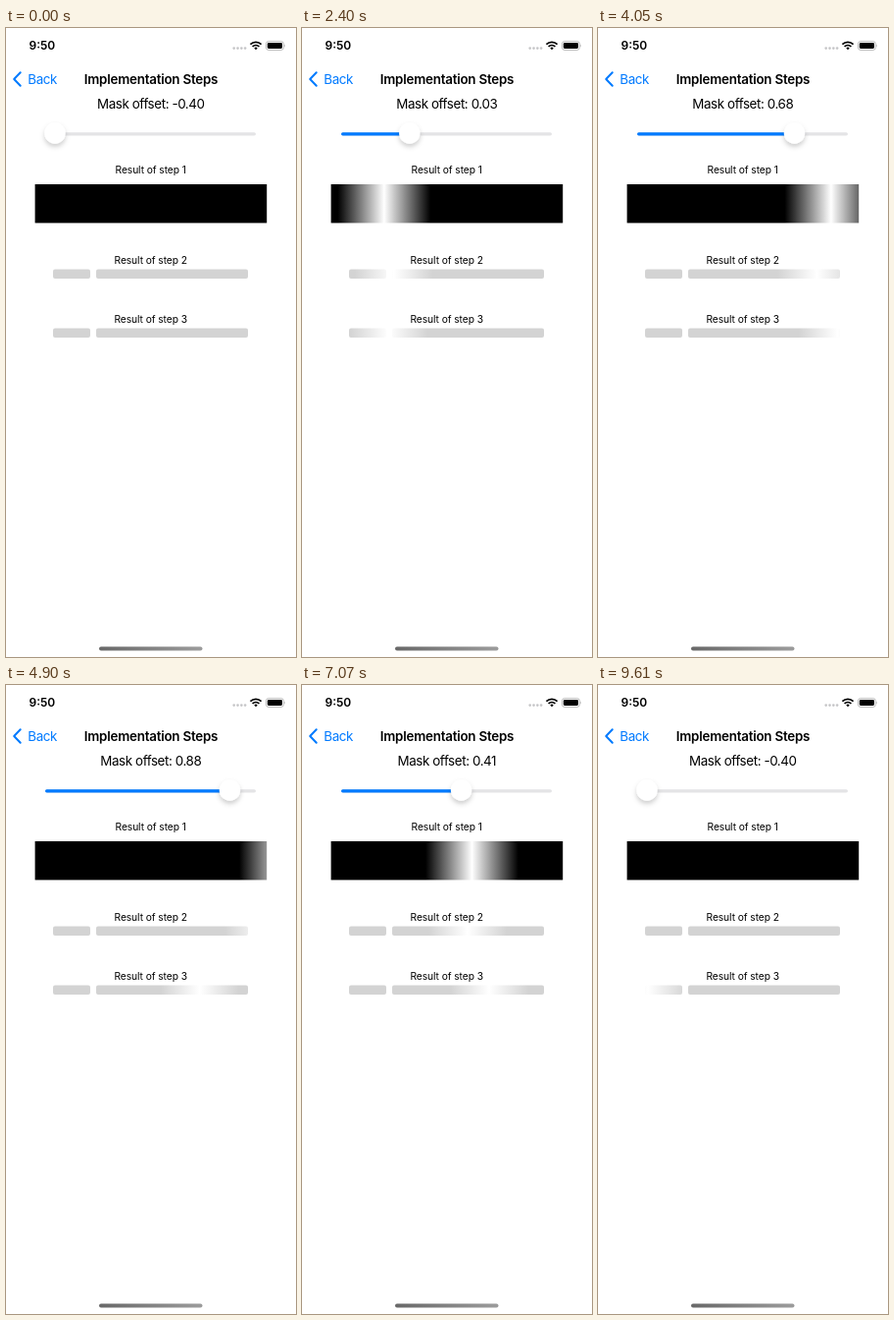
Recreate the animation shown at these times as an HTML page. Size 296 by 640 pixels, loop 9.66 s.

```html
<!DOCTYPE html>
<html lang="en">
<head>
<meta charset="utf-8">
<title>Implementation Steps</title>
<style>
  html, body { margin: 0; width: 100%; height: 100%; overflow: hidden; background: #fff; }
  svg { display: block; width: 100vw; height: 100vh; }
  text { font: 13.42px Inter, "Open Sans", sans-serif; letter-spacing: -.42px; }
  .mid { text-anchor: middle; }
  .bold { font-weight: 600; letter-spacing: -.24px; }
  .small { font-size: 10.26px; letter-spacing: -.08px; }
</style>
</head>
<body>
<svg viewBox="0 0 296 640">
  <defs>
    <linearGradient id="g1" gradientUnits="userSpaceOnUse" y1="0" y2="0">
      <stop offset="0"/><stop offset=".5" stop-color="#fff"/><stop offset="1"/>
    </linearGradient>
    <linearGradient id="g2" gradientUnits="userSpaceOnUse" y1="0" y2="0">
      <stop offset="0" stop-color="#d3d3d3"/><stop offset=".5" stop-color="#fff"/><stop offset="1" stop-color="#d3d3d3"/>
    </linearGradient>
    <linearGradient id="g3" href="#g2" gradientUnits="userSpaceOnUse" y1="0" y2="0"/>
    <linearGradient id="home"><stop offset="0" stop-color="#686868"/><stop offset="1" stop-color="#9c9c9c"/></linearGradient>
    <filter id="shadow" x="-50%" y="-50%" width="200%" height="200%">
      <feDropShadow dx="0" dy="3" stdDeviation="2.6" flood-opacity=".2"/>
    </filter>
  </defs>

  <!-- status bar -->
  <text x="23.5" y="22.3" class="bold" style="font-size:12px;letter-spacing:0">9:50</text>
  <g fill="#c6c6c8">
    <circle cx="232.7" cy="20.6" r="1.3"/><circle cx="236.5" cy="20.6" r="1.3"/>
    <circle cx="240.3" cy="20.6" r="1.3"/><circle cx="244.1" cy="20.6" r="1.3"/>
  </g>
  <g fill="none" stroke="#000" stroke-width="1.8">
    <path d="M249.4 16.6a8 8 0 0 1 11.2 0M251.6 18.9a4.9 4.9 0 0 1 6.8 0"/>
    <path d="M253.3 20.4L255 22.2L256.7 20.4A2.5 2.5 0 0 0 253.3 20.4Z" fill="#000" stroke="none"/>
  </g>
  <rect x="265.4" y="13.6" width="18" height="8.8" rx="2.6" fill="none" stroke="#aaa" stroke-width=".8"/>
  <rect x="266.8" y="15" width="15.2" height="6" rx="1.4"/>
  <path d="M284.4 16.6q1.4 1.4 0 2.8z" fill="#aaa"/>

  <!-- navigation bar -->
  <path d="M14.7 45.3L8.2 52L14.7 58.7" fill="none" stroke="#007aff" stroke-width="2" stroke-linecap="round" stroke-linejoin="round"/>
  <text x="22.3" y="56.8" fill="#007aff">Back</text>
  <text x="148" y="56.8" class="mid bold">Implementation Steps</text>

  <!-- slider -->
  <text id="label" x="147.8" y="82.2" class="mid"></text>
  <rect x="40" y="106.2" width="215" height="3.2" rx="1.6" fill="#e4e4e6"/>
  <rect id="filled" x="40" y="106.2" height="3.2" rx="1.6" fill="#007aff"/>
  <circle id="knob" cy="107" r="10.7" fill="#fff" filter="url(#shadow)"/>

  <!-- results -->
  <text x="147.7" y="148.3" class="mid small">Result of step 1</text>
  <rect x="29.6" y="159" width="236.6" height="39.4" fill="url(#g1)"/>
  <text x="147.7" y="239.8" class="mid small">Result of step 2</text>
  <path d="M50 245.5h34q2 0 2 2v5.5q0 2-2 2h-34q-2 0-2-2v-5.5q0-2 2-2zM94 245.5h151q2 0 2 2v5.5q0 2-2 2h-151q-2 0-2-2v-5.5q0-2 2-2z" fill="url(#g2)"/>
  <text x="147.7" y="299.8" class="mid small">Result of step 3</text>
  <path d="M50 305.5h34q2 0 2 2v5.5q0 2-2 2h-34q-2 0-2-2v-5.5q0-2 2-2zM94 305.5h151q2 0 2 2v5.5q0 2-2 2h-151q-2 0-2-2v-5.5q0-2 2-2z" fill="url(#g3)"/>

  <rect x="95" y="629.6" width="105.5" height="4" rx="2" fill="url(#home)"/>
</svg>
<script>
const LOOP = 9660, STEP = 109, SHIMMER = 1048;
const MIN = -0.4, RANGE = 1.4, BAND = 0.4;

// Slider drag: [ms, offset]
const drag = [
  [0, -.4], [900, -.4], [2400, .03], [3270, .46], [4900, .88],
  [5500, 1], [5800, 1], [6320, .81], [7950, -.2], [8600, -.4], [LOOP, -.4]
];
const $ = id => document.getElementById(id);

const rate = i => (drag[i + 1][1] - drag[i][1]) / (drag[i + 1][0] - drag[i][0]);

// Slope at a key, chosen so the curve never overshoots
function slope(i) {
  if (i < 1 || i > drag.length - 2) return 0;
  const a = rate(i - 1), b = rate(i);
  return a * b <= 0 ? 0 : 2 * a * b / (a + b);
}

function offsetAt(t) {
  let i = 0;
  while (i < drag.length - 2 && t >= drag[i + 1][0]) i++;
  const [t0, v0] = drag[i], [t1, v1] = drag[i + 1];
  const h = t1 - t0, u = (t - t0) / h, w = 1 - u;
  return v0 * w * w * (1 + 2 * u) + v1 * u * u * (3 - 2 * u)
    + h * u * w * (slope(i) * w - slope(i + 1) * u);
}

function moveBand(id, left, width, offset) {
  $(id).setAttribute("x1", left + width * offset);
  $(id).setAttribute("x2", left + width * (offset + BAND));
}

function draw(now) {
  // The screen refreshes in fixed steps
  const t = Math.floor((now % LOOP + 10) / STEP) * STEP;
  const v = offsetAt(t);
  const x = 50 + 195 * (v - MIN) / RANGE;

  $("label").textContent = "Mask offset: " + v.toFixed(2);
  $("knob").setAttribute("cx", x);
  $("filled").setAttribute("width", v > MIN + .001 ? x - 40 : 0);
  moveBand("g1", 29.6, 236.6, v);
  moveBand("g2", 48, 199, v);
  moveBand("g3", 48, 199, MIN + RANGE * (t / SHIMMER % 1));
}

let start;
function frame(now) {
  start ??= now;
  draw(now - start);
  requestAnimationFrame(frame);
}
draw(0);
requestAnimationFrame(frame);
</script>
</body>
</html>
```
